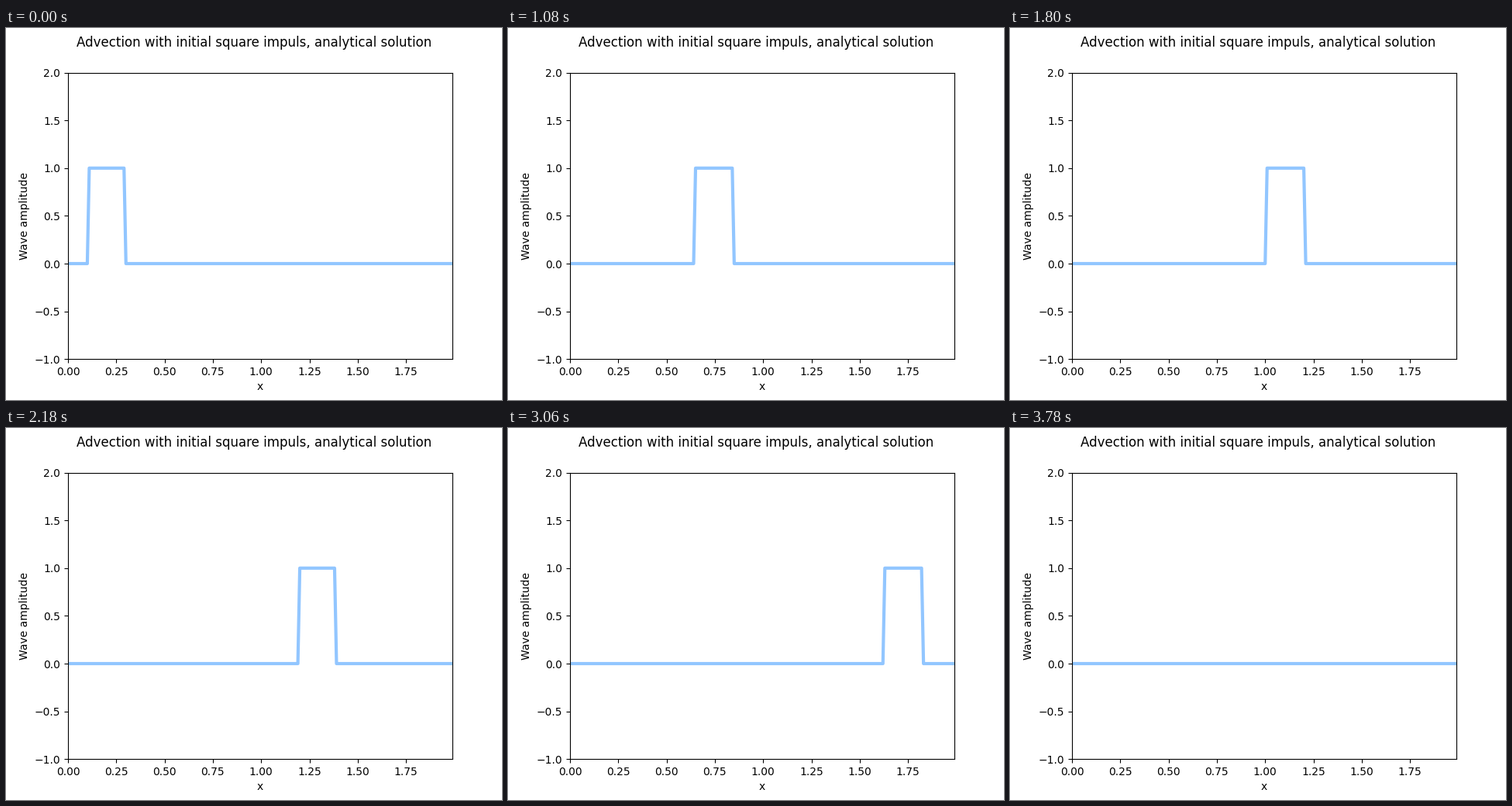
Recreate the animation shown at these times as a matplotlib script. Size 640 by 480 pixels, loop 6 s.

```python
import matplotlib.pyplot as plt
import numpy as np
from matplotlib.animation import FuncAnimation

STEP = 0.01
FRAMES = 300
INTERVAL = 20

plt.rcParams["font.family"] = "DejaVu Sans"

x = np.arange(200) * STEP


def square_impulse(s):
    return np.where((s > 0.1) & (s < 0.3), 1.0, 0.0)


fig, ax = plt.subplots(figsize=(6.4, 4.8), dpi=100)
fig.suptitle("Advection with initial square impuls, analytical solution")
ax.set(xlim=(0, x[-1]), ylim=(-1, 2), xlabel="x", ylabel="Wave amplitude")
wave, = ax.plot(x, square_impulse(x), color="#92C6FF", lw=3)


def update(frame):
    # Unit wave speed: the impulse travels one grid cell per frame.
    wave.set_ydata(square_impulse(x - frame * STEP))
    return wave,


anim = FuncAnimation(fig, update, frames=FRAMES, interval=INTERVAL,
                     repeat=True, repeat_delay=0)
plt.show()
```
